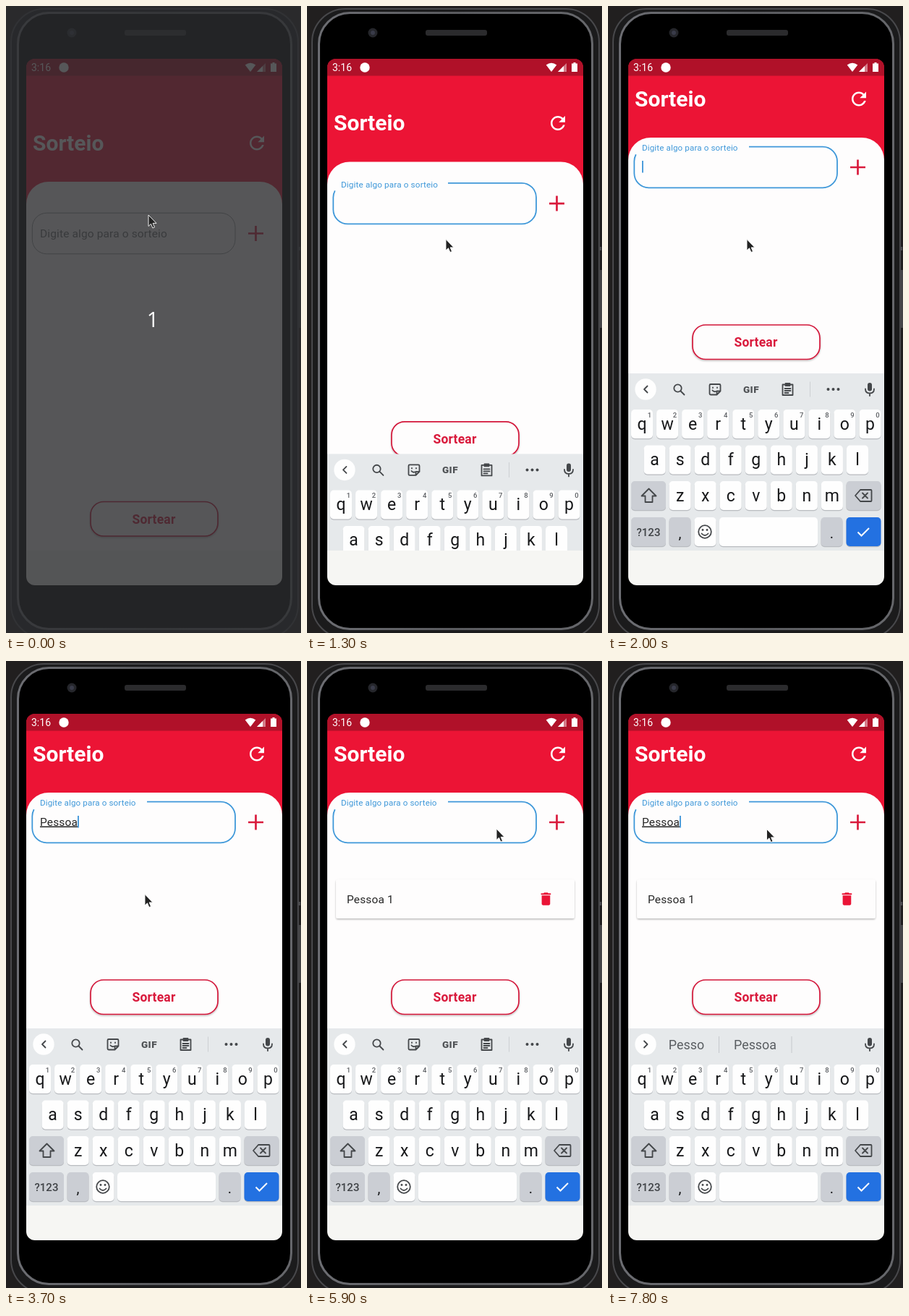
An HTML page for the animation above (8000 ms loop, 408 px wide and 867 px high).

```html
<!DOCTYPE html>
<html lang="pt">
<head>
<meta charset="utf-8">
<title>Sorteio</title>
<style>
  html, body { margin: 0; width: 100%; height: 100%; overflow: hidden; background: #211f1f; }
  svg { display: block; width: 100vw; height: 100vh; }
  text { font-family: Roboto, "Open Sans", sans-serif; white-space: pre; }
  .mid { text-anchor: middle; }
  .body { font-size: 15.5px; letter-spacing: .13px; fill: #262626; }
  .line { fill: none; stroke: #44474a; stroke-width: 1.8; stroke-linejoin: round; stroke-linecap: round; }
</style>
</head>
<body>
<svg viewBox="0 0 408 867" xmlns="http://www.w3.org/2000/svg">
  <defs>
    <clipPath id="screen"><rect x="28" y="73" width="354" height="728" rx="12"/></clipPath>
    <clipPath id="app"><rect x="28" y="73" width="354" height="680"/></clipPath>
    <linearGradient id="rim" x2="1" y2="0">
      <stop offset="0" stop-color="#6c6d72"/><stop offset=".5" stop-color="#5a5b5f"/><stop offset="1" stop-color="#66676b"/>
    </linearGradient>
    <filter id="soft" x="-10%" y="-20%" width="120%" height="150%">
      <feDropShadow dx="0" dy="1.4" stdDeviation="1.1" flood-color="#000" flood-opacity=".28"/>
    </filter>
  </defs>

  <!-- phone body -->
  <rect width="408" height="867" fill="#211f1f"/>
  <path d="M406 333v5M406.5 365v80" stroke="#4c4c4f" stroke-width="2.5"/>
  <rect x="7" y="4" width="397" height="870" rx="46" fill="#1b1b1c" stroke="#48484b" stroke-width="2"/>
  <rect x="16.5" y="9.5" width="378" height="852" rx="43" fill="#000" stroke="url(#rim)" stroke-width="3"/>
  <circle cx="91" cy="37" r="6.5" fill="#25262b"/>
  <circle cx="91" cy="37" r="3" fill="#393b49"/>
  <rect x="164" y="33" width="85" height="8" rx="3" fill="#2b2b2d"/>

  <g clip-path="url(#screen)">
    <g clip-path="url(#app)">
      <rect x="28" y="73" width="354" height="680" fill="#ec1435"/>
      <g id="head">
        <text x="37" y="199.5" font-size="30" font-weight="700" fill="#fff">Sorteio</text>
        <path transform="translate(332 174.500) scale(1.25)" fill="#fff" d="M17.65 6.35C16.2 4.9 14.21 4 12 4c-4.42 0-7.99 3.58-7.99 8s3.57 8 7.99 8c3.73 0 6.84-2.55 7.73-6h-2.08c-.82 2.33-3.04 4-5.65 4-3.31 0-6-2.69-6-6s2.69-6 6-6c1.66 0 3.14.69 4.22 1.78L13 11h7V4z"/>
        <rect x="28" y="243" width="354" height="800" rx="31" fill="#fefdfd"/>
      </g>
      <g id="field">
        <path id="border" fill="none"/>
        <text id="label" x="47" letter-spacing=".13">Digite algo para o sorteio</text>
        <text id="typed" class="body" x="47" y="319"></text>
        <rect id="caret" y="305.500" width="1.8" height="16.500" fill="#3b93d8"/>
        <path d="M345.500 304v21M335 314.500h21" stroke="#d91a3c" stroke-width="2.7"/>
      </g>
      <g id="card">
        <rect x="40" y="302" width="330" height="54" rx="3" fill="#fefdfd" filter="url(#soft)"/>
        <text class="body" x="55" y="334.500">Pessoa 1</text>
        <path transform="translate(318.800 317.400) scale(.97)" fill="#ea1436" d="M6 19c0 1.100.9 2 2 2h8c1.100 0 2-.9 2-2V7H6zM19 4h-3.500l-1-1h-5l-1 1H5v2h14z"/>
      </g>
      <g id="button">
        <rect x="117" y="685.500" width="176" height="47.500" rx="18" fill="#fefdfd" stroke="#d3183a" stroke-width="1.7" filter="url(#soft)"/>
        <text class="mid" x="204.500" y="715.500" font-size="17.500" font-weight="700" letter-spacing=".2" fill="#d91a3c">Sortear</text>
      </g>
      <rect x="28" y="73" width="354" height="23.500" fill="#b01129"/>
      <g fill="#fff">
        <text x="35" y="90" font-size="14">3:16</text>
        <circle cx="80" cy="85" r="6.700"/>
        <path d="M338 91L330.700 81.500Q338 76 345.300 81.500Z"/>
        <path d="M347 91L359 79V91Z" opacity=".45"/>
        <path d="M347 91L355 83V91Z"/>
        <path d="M368.500 78h3v1.500h2.500v11.500h-8v-11.500h2.500z"/>
      </g>
      <g id="keyboard">
        <rect x="28" y="508" width="354" height="260" fill="#e6e9eb"/>
        <circle cx="52" cy="530" r="14.700" fill="#fefefe"/>
        <path id="chevron" class="line"/>
        <g id="tools">
          <circle class="line" cx="96.500" cy="528.500" r="5.200"/>
          <path class="line" d="M100.500 532.500l5 5"/>
          <path class="line" stroke-width="1.500" d="M142 523h12q1.500 0 1.500 1.500v8l-5 5h-8.500q-1.500 0-1.500-1.500v-11.500q0-1.500 1.500-1.500zM150.500 537.500v-5h5M145 527.500v.5M151 527.500v.5M144.500 531.500q2 2.500 4.500 1.500"/>
          <text class="mid" x="198" y="535" font-size="13.500" font-weight="900" letter-spacing=".5" fill="#505356">GIF</text>
          <path class="line" d="M241.500 523.500h14v14.500h-14zM245.500 522h6v3h-6zM244.500 529h8M244.500 532h8M244.500 535h5"/>
          <path d="M279.500 519.500v21" stroke="#cdd0d3"/>
          <g fill="#44474a"><circle cx="304.500" cy="530" r="2"/><circle cx="311.500" cy="530" r="2"/><circle cx="318.500" cy="530" r="2"/></g>
        </g>
        <g id="hints" font-size="17.900" fill="#5a5e62">
          <path d="M153.500 519v23M254 519v23" stroke="#c6c9cc"/>
          <text class="mid" x="108.500" y="537"></text>
          <text class="mid" x="203.500" y="537"></text>
          <text class="mid" x="304" y="537"></text>
        </g>
        <rect x="359" y="521" width="6" height="11.500" rx="3" fill="#44474a"/>
        <path class="line" d="M356 529.500q0 6 6 6t6-6M362 535.500v3.500"/>
        <g id="keys"></g>
        <path id="shift" class="line" d="M56.500 667.500l-10 10h5v8.500h10v-8.500h5z"/>
        <path class="line" d="M349 669h14.500q1 0 1 1v14q0 1-1 1H349l-7-8zM352 673.500l7 7M359 673.500l-7 7"/>
        <circle class="line" cx="134" cy="727" r="8.800"/>
        <path class="line" d="M129.500 729.500q4.500 5 9 0"/>
        <circle cx="131" cy="724.500" r="1.400" fill="#44474a"/><circle cx="137" cy="724.500" r="1.400" fill="#44474a"/>
        <path d="M345.500 727.500l5 5 10.500-10.500" fill="none" stroke="#fff" stroke-width="2"/>
      </g>
    </g>
    <rect x="28" y="753" width="354" height="48" fill="#f6f6f3"/>
  </g>

  <g id="shade">
    <rect width="408" height="867" fill="#2c2d30" opacity=".8"/>
    <text class="mid" x="203" y="444" font-size="29" fill="#fff" style="font-family:'Open Sans',sans-serif">1</text>
  </g>
  <path id="cursor" d="M0 0V15.500L3.500 12.300 5.900 18 8.500 16.900 6.100 11.400H11Z" fill="#222" stroke="#fff" stroke-width=".9"/>
</svg>
<script>
const LOOP = 8000, STEP = 100;
const $ = id => document.getElementById(id);
const clamp = v => Math.max(0, Math.min(1, v));
const lerp = (a, b, u) => a + (b - a) * u;
const easeOut = u => 1 - (1 - clamp(u)) ** 3;
const show = (id, on) => $(id).setAttribute('display', on ? 'inline' : 'none');
const shift = (id, y) => $(id).setAttribute('transform', `translate(0 ${y})`);
const within = (t, spans) => spans.some(([a, b]) => t >= a && t < b);
// last entry whose start time has passed
const latest = (list, t) => list.filter(e => e[0] <= t).pop();

const letters = [];
function add(tag, attrs, text = '') {
  const el = document.createElementNS('http://www.w3.org/2000/svg', tag);
  for (const k in attrs) el.setAttribute(k, attrs[k]);
  el.textContent = text;
  $('keys').append(el);
  return el;
}
function key(x, y, w, fill = '#fefefe') {
  add('rect', { x, y: y + 1.2, width: w, height: 40, rx: 5, fill: '#b9bcc0' });
  add('rect', { x, y, width: w, height: 40, rx: 5, fill });
}
function label(x, y, size, text, weight = 400, fill = '#17181a') {
  return add('text', { x, y, class: 'mid', 'font-size': size, 'font-weight': weight, fill }, text);
}
function buildKeys() {
  const grey = '#cbced4';
  [['qwertyuiop', 32, 558], ['asdfghjkl', 49.6, 607.5], ['zxcvbnm', 84.6, 657]].forEach(([row, x0, y], r) => {
    [...row].forEach((c, i) => {
      const x = x0 + 35.05 * i;
      key(x, y, 30);
      letters.push(label(x + 15, y + 27.5, 23, c));
      if (!r) label(x + 25.5, y + 10.5, 9.5, (i + 1) % 10, 500, '#5c5f63');
    });
  });
  key(32, 657, 48, grey);
  key(329.5, 657, 48, grey);
  key(32, 707, 48, grey);
  key(84.5, 707, 30, grey);
  key(119.5, 707, 30);
  key(154, 707, 136);
  key(294.5, 707, 30, grey);
  key(329.5, 707, 48, '#2371e1');
  label(56, 732.5, 15, '?123', 500, '#3f4246');
  label(99.5, 736, 20, ',');
  label(309.5, 736, 20, '.');
}

const typing = [[0, ''], [3700, 'Pessoa'], [4000, 'Pessoa '], [4500, 'Pessoa 1'], [5600, ''],
  [7300, 'P'], [7600, 'Pes'], [7700, 'Pess'], [7800, 'Pessoa']];
const caretOn = [[2000, 2700], [3700, 5000], [5600, 5900], [6300, LOOP]];
const hints = [[7400, 'P', 'Para', 'Por'], [7600, 'Pes', 'Pessoa', 'Pés'],
  [7700, 'Pess', 'Pessoa', ''], [7800, 'Pesso', 'Pessoa', '']];
const pointer = [[0, 197, 289], [100, 199.5, 308], [200, 195, 322], [300, 191.5, 332], [600, 192, 322.5],
  [5800, 306, 231], [5900, 262, 232], [6300, 292, 233], [6400, 252, 233], [6500, 219.5, 232.5]];
// typed width in em
const em = { P: .631, e: .53, s: .516, o: .57, a: .544, ' ': .248, 1: .562 };
const widthOf = s => [...s].reduce((w, c) => w + em[c] * 15.5 + .13, 0);

function drawField(t) {
  const focus = t >= 1200, up = easeOut((t - 1100) / 300), open = up > .6;
  const l = 36.3, r = 317, top = 286.2, bot = 342.8, R = 20;
  const arc = (x, y) => `A${R} ${R} 0 0 1 ${x} ${y}`;
  const end = open ? arc(38.7, top + 10.5) : arc(l + R, top) + 'Z';
  const b = $('border');
  b.setAttribute('d', `M${open ? 195 : l + R} ${top}H${r - R}${arc(r, top + R)}V${bot - R}${arc(r - R, bot)}H${l + R}${arc(l, bot - R)}V${top + R}${end}`);
  b.setAttribute('stroke', focus ? '#3f98d9' : '#999');
  b.setAttribute('stroke-width', focus ? 1.8 : 1);
  const lab = $('label');
  lab.setAttribute('y', lerp(320, 291.2, up));
  lab.setAttribute('font-size', lerp(15.5, 11.62, up));
  lab.setAttribute('fill', focus ? '#3f98d9' : '#6d6d6d');

  const text = latest(typing, t)[1];
  $('typed').textContent = text.trimEnd();
  $('typed').setAttribute('text-decoration', text.endsWith('1') ? 'none' : 'underline');
  $('caret').setAttribute('x', 47 + widthOf(text));
  show('caret', within(t, caretOn));
}

function drawKeyboard(t) {
  const caps = t >= 2700 && t < 3000, sug = latest(hints, t);
  show('keyboard', t >= 1200);
  shift('keyboard', 245 * (1 - easeOut((t - 1200) / 433)));
  letters.forEach(el => {
    el.textContent = caps ? el.textContent.toUpperCase() : el.textContent.toLowerCase();
  });
  $('shift').style.fill = caps ? '#44474a' : 'none';
  show('tools', !sug);
  show('hints', sug);
  $('chevron').setAttribute('d', sug ? 'M50 525.500l4.500 4.500-4.500 4.500' : 'M54.500 525.500l-4.500 4.500 4.500 4.500');
  if (sug) document.querySelectorAll('#hints text').forEach((el, i) => el.textContent = sug[i + 1]);
}

function drawPointer(t) {
  let [, x, y] = latest(pointer, t);
  if (t >= 4700 && t < 5800) {
    const u = clamp((t - 4600) / 600), s = u * u * (3 - 2 * u);
    x = lerp(192, 351, s);
    y = lerp(322.5, 227, s);
  }
  $('cursor').setAttribute('transform', `translate(${x} ${y})`);
}

function render(ms) {
  const t = Math.floor(ms % LOOP / STEP) * STEP;
  const p = easeOut((t - 1200) / 550);
  shift('head', -61 * p);
  shift('field', -91.5 * p);
  shift('button', -244.5 * p);
  show('card', t >= 5600);
  show('shade', t < 100);
  drawField(t);
  drawKeyboard(t);
  drawPointer(t);
}

buildKeys();
const start = performance.now();
function tick() {
  render(performance.now() - start);
  requestAnimationFrame(tick);
}
tick();
</script>
</body>
</html>
```
